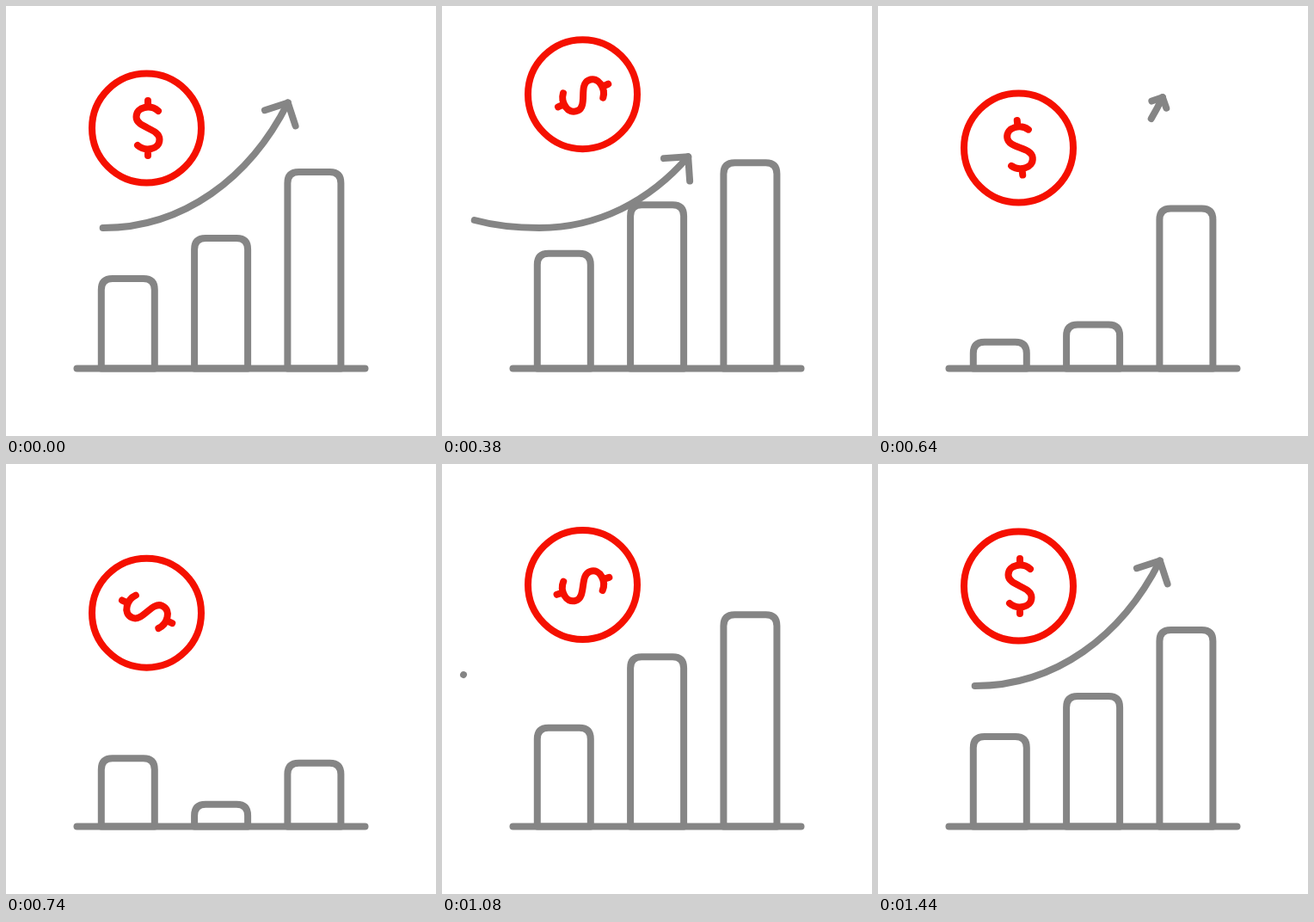
Animation of 500 by 500 pixels, one loop 2 s. Source, as an HTML page:

```html
<!DOCTYPE html>
<html lang="en">
<head>
<meta charset="utf-8">
<title>Growth chart</title>
<style>
  html, body { margin: 0; width: 100%; height: 100%; overflow: hidden; background: #fff; }
  svg { display: block; width: 100%; height: 100%; }
  path, circle { fill: none; stroke: #858585; stroke-width: 8; stroke-linecap: round; stroke-linejoin: round; }
  #coin * { stroke: #f51000; }
</style>
</head>
<body>
<svg viewBox="0 0 500 500">
  <path d="M82.5 421.5H417.5"/>
  <path class="bar"/>
  <path class="bar"/>
  <path class="bar"/>
  <g id="arrow">
    <path id="shaft" d="M25 245C50 254 82 258 113 258C208 258 287 198 331 106"/>
    <path id="head"/>
  </g>
  <g id="coin">
    <circle r="63.5"/>
    <path id="dollar" d="M12-20C4-27-13.5-26-13.5-13C-13.5 0 13.5 0 13.5 13C13.5 26-4 27-12 20M0-32V-25M0 25V32"/>
  </g>
</svg>
<script>
const LOOP = 2000, STEP = 20, END = 1440;
const LOW = 399, FALL = 310;
const $ = id => document.getElementById(id);
const shaft = $('shaft'), head = $('head');
const shaftLength = shaft.getTotalLength();

// Eased 0 to 1 between two times
function ramp(t, from, to) {
  const x = Math.min(1, Math.max(0, (t - from) / (to - from)));
  return x * x * (3 - 2 * x);
}

// Each bar drops to LOW after a peak, if there is time left, then returns to rest
function makeBar(rest, peak, start, ...peakTimes) {
  const dips = peakTimes.flatMap(p => [[p, peak], [p + FALL, LOW]]);
  return [[start, rest], ...dips.filter(([t]) => t < END - 150), [END, rest]];
}

const bars = [
  makeBar(317, 250, 0, 278, 950),
  makeBar(270, 219, 320, 408, 992),
  makeBar(193, 157, 300, 522, 1130)
];
const barShapes = document.querySelectorAll('.bar');

const glide = (t, keys) => keys.slice(1).reduce(
  (y, [time, to], i) => y + (to - keys[i][1]) * ramp(t, keys[i][0], time), keys[0][1]);

function drawBars(t) {
  bars.forEach((keys, i) => {
    const x = 110.8 + i * 108.3, y = glide(t, keys);
    barShapes[i].setAttribute('d', `M${x} 421.5V${y + 13}q0-13 13-13h36q13 0 13 13V421.5z`);
  });
}

function drawCoin(t) {
  const y = 142 - 40 * ramp(t, 0, 360) + 72 * ramp(t, 360, 720)
    - 65 * ramp(t, 720, 1015) + 33 * ramp(t, 1015, 1090);
  const angle = 66 * ramp(t, 0, 400) - 426 * ramp(t, 400, 1320);
  $('coin').setAttribute('transform', `translate(163.5 ${y})`);
  $('dollar').setAttribute('transform', `rotate(${angle}) translate(1.5 0)`);
}

// The arrow draws back, shoots off the end, then grows again from the start
function arrowSpan(t) {
  if (t >= 1080) return [89 * ramp(t, 1140, END), 363 * ramp(t, 1080, END)];
  const back = 76 * ramp(t, 0, 400);
  return [89 - back + 357 * ramp(t, 400, 690), 363 - back + 83 * ramp(t, 400, 550)];
}

function drawArrow(t) {
  const [tail, end] = arrowSpan(t);
  const tip = Math.min(end, shaftLength);
  const visible = t >= 1080 || tail < tip - 2;
  $('arrow').style.display = visible ? '' : 'none';
  if (!visible) return;
  const length = Math.max(tip - tail, 0.01);
  shaft.setAttribute('stroke-dasharray', `${length} 999`);
  shaft.setAttribute('stroke-dashoffset', -tail);

  const p = shaft.getPointAtLength(tip);
  const q = shaft.getPointAtLength(Math.max(tip - 2, 0));
  const angle = Math.atan2(p.y - q.y, p.x - q.x) * 180 / Math.PI;
  const size = 20 * Math.min(1, length / 60);
  head.style.display = size > 1 ? '' : 'none';
  head.setAttribute('d', `M${-size} ${-size}L0 0L${-size} ${size}`);
  head.setAttribute('transform', `translate(${p.x} ${p.y}) rotate(${angle})`);
}

const start = performance.now();
function tick() {
  const t = Math.floor((performance.now() - start) % LOOP / STEP) * STEP;
  drawBars(t);
  drawArrow(t);
  drawCoin(t);
  requestAnimationFrame(tick);
}
tick();
</script>
</body>
</html>
```
